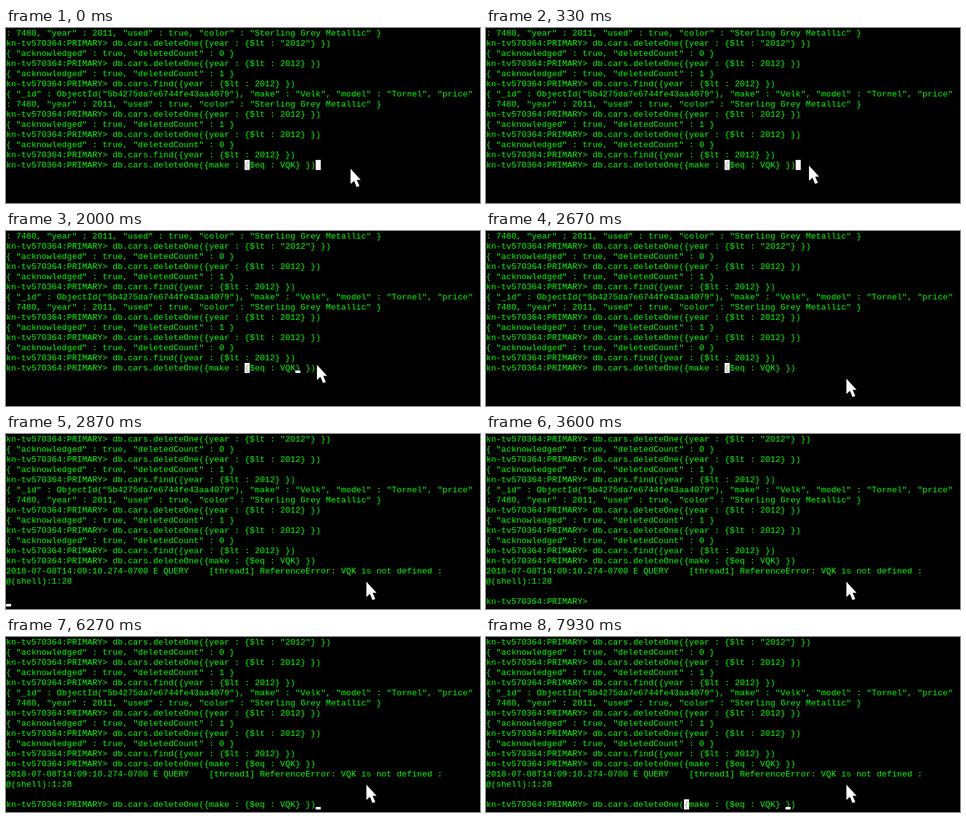
An HTML page for the animation above (8 s loop, 747 by 276 pixels).

```html
<!DOCTYPE html>
<html lang="en">
<head>
<meta charset="utf-8">
<title>Shell session</title>
<style>
  html, body { margin: 0; width: 100%; height: 100%; overflow: hidden; background: #000; }
  svg { display: block; }
  text { font: 13.3333px "Liberation Mono", monospace; white-space: pre; fill: #0f0; }
  .block { fill: #fff; }
  #mark text { fill: #a79bb5; }
</style>
</head>
<body>
<svg id="stage" width="747" height="276" viewBox="0 0 747 276">
  <rect width="747" height="276" fill="#000"/>
  <g id="log"></g>
  <rect id="picked" class="block" x="488" y="208" width="8" height="16"/>
  <g id="mark"><rect class="block" width="8" height="16"/><text y="12"></text></g>
  <rect id="caret" class="block" y="12" width="8" height="4"/>
  <path id="arrow" d="M0 0V24L5.5 19L9.7 29L14 27L9.8 17.6H16Z" fill="#fff" stroke="#000" paint-order="stroke"/>
</svg>
<script>
const LOOP = 8000, FPS = 15, CW = 8, CH = 16;
const $ = id => document.getElementById(id);

const prompt = 'kn-tv570364:PRIMARY> ';
const remove = prompt + 'db.cars.deleteOne({year : {$lt : 2012} })';
const find = prompt + 'db.cars.find({year : {$lt : 2012} })';
const command = prompt + 'db.cars.deleteOne({make : {$eq : VQK} })';
const reply = n => `{ "acknowledged" : true, "deletedCount" : ${n} }`;
const tail = ': 7480, "year" : 2011, "used" : true, "color" : "Sterling Grey Metallic" }';

const lines = [
  tail,
  remove.replace('2012', '"2012"'), reply(0),
  remove, reply(1),
  find,
  '{ "_id" : ObjectId("5b4275da7e6744fe43aa4079"), "make" : "Velk", "model" : "Tornel", "price"',
  tail,
  remove, reply(1),
  remove, reply(0),
  find,
  command,
  '2018-07-08T14:09:10.274-0700 E QUERY    [thread1] ReferenceError: VQK is not defined :',
  '@(shell):1:28',
  '',
  ''
];

const rows = lines.map((line, i) => {
  const el = document.createElementNS('http://www.w3.org/2000/svg', 'text');
  el.setAttribute('y', i * CH + 12);
  el.textContent = line;
  $('log').append(el);
  return el;
});
const input = rows[rows.length - 1];

// Pointer moves: first tick, number of steps, end point
const start = [543, 222];
const moves = [
  [1, 5, 509, 217],
  [16, 3, 500, 215],
  [26, 4, 490, 211],
  [38, 3, 568, 233]
];

// Key presses: tick, caret column, marked column
const keys = [
  [0, 57, 47],
  [43, 0],
  [44, 21],
  [69, 61],
  [95, 60, 38],
  [119, 59, 39]
];

const place = (el, x, y) => el.setAttribute('transform', `translate(${x} ${y})`);
const show = (el, on) => el.setAttribute('visibility', on ? 'visible' : 'hidden');

function pointer(tick) {
  let [x, y] = start;
  for (const [from, steps, tx, ty] of moves) {
    const p = Math.max(0, Math.min(1, (tick - from + 1) / steps));
    const e = p * p * (3 - 2 * p);
    x += (tx - x) * e;
    y += (ty - y) * e;
  }
  return [Math.round(x), Math.round(y)];
}

function caretOn(tick) {
  const pressed = (tick >= 43 && tick < 46) || tick >= 119;
  return pressed || (tick >= 14 && Math.floor((tick - 14) / 8) % 2 === 0);
}

function draw(ms) {
  const tick = Math.floor((ms + 3.4) * FPS / 1000);
  const entered = tick >= 43;
  const top = (entered ? 16 : 13) * CH;
  const [, col, marked] = keys.filter(k => k[0] <= tick).pop();

  place($('log'), 0, entered ? -CH : 0);
  rows.slice(14, 16).forEach(el => show(el, entered));
  input.textContent = tick < 44 ? '' : tick < 69 ? prompt : command;

  show($('picked'), tick < 29);
  show($('mark'), marked);
  if (marked) {
    place($('mark'), marked * CW, top);
    $('mark').lastChild.textContent = command[marked];
  }
  show($('caret'), caretOn(tick));
  place($('caret'), col * CW, top);
  place($('arrow'), ...pointer(tick));
}

const t0 = performance.now();
function loop() {
  draw((performance.now() - t0) % LOOP);
  requestAnimationFrame(loop);
}
loop();
</script>
</body>
</html>
```
